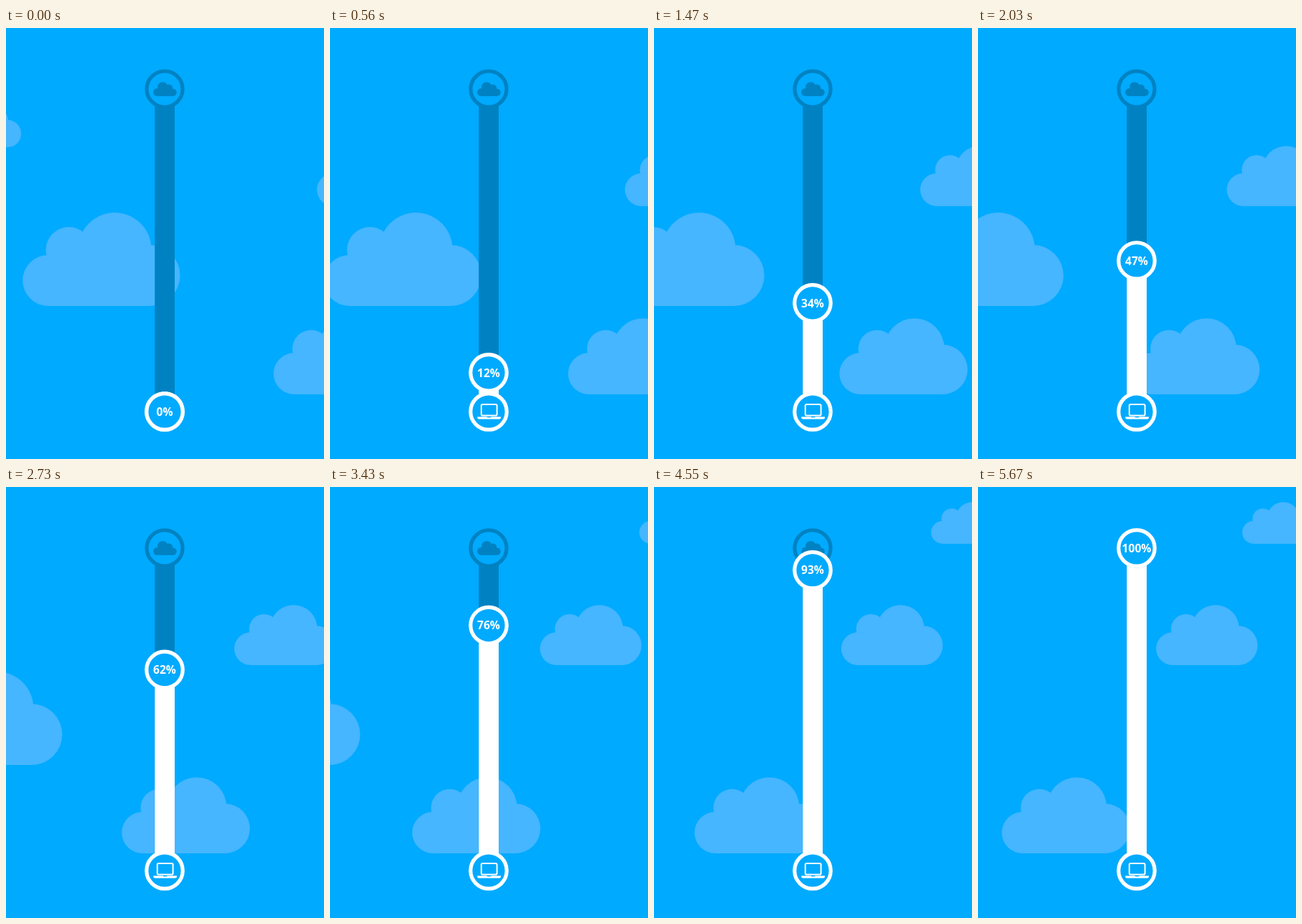
These frames come from a looping animation (443x600 px, 6.37 s). An HTML page:

```html
<!DOCTYPE html>
<html lang="en">
<head>
<meta charset="utf-8">
<title>Upload progress</title>
<style>
  html, body { margin: 0; width: 100%; height: 100%; overflow: hidden; background: #00aaff; }
  svg { display: block; width: 100%; height: 100%; }
  .cloud { fill: #45b6ff; }
  .dark { fill: #0082c2; }
  .ring { fill: #00aaff; stroke: #fff; stroke-width: 5.2; }
  .ring.goal { stroke: #0082c2; }
  text { font: 700 15.6px "Open Sans", "Noto Sans", sans-serif; fill: #fff; text-anchor: middle; }
</style>
</head>
<body>
<svg viewBox="0 0 443 600">
  <defs>
    <g id="cloud">
      <circle cx="35.7" cy="-35.5" r="35.5"/>
      <circle cx="64.5" cy="-78" r="32"/>
      <circle cx="128.5" cy="-79" r="51"/>
      <circle cx="177" cy="-42.5" r="42.5"/>
      <rect x="35.7" y="-71" width="141.3" height="71"/>
    </g>
  </defs>
  <g id="sky"></g>

  <rect class="dark" x="207.3" y="85" width="27.7" height="449"/>
  <rect id="fill" x="207.3" width="27.7" fill="#fff"/>

  <circle class="ring goal" cx="221" cy="85" r="25"/>
  <g class="dark">
    <circle cx="210.6" cy="89.4" r="5.4"/>
    <circle cx="218.3" cy="82.4" r="7.2"/>
    <circle cx="227" cy="83.6" r="5.2"/>
    <circle cx="232.6" cy="89.6" r="5.2"/>
    <rect x="210.6" y="85" width="22" height="9.8"/>
  </g>

  <circle class="ring" cx="221" cy="534" r="25.2"/>
  <rect x="210.8" y="524" width="21.8" height="15.6" rx="1.8" fill="none" stroke="#fff" stroke-width="2"/>
  <path d="M205.3 541.2H218.6L219.4 542.2H223.8L224.6 541.2H238V542.4Q238 544.4 235.8 544.4H207.5Q205.3 544.4 205.3 542.4Z" fill="#fff"/>

  <g id="knob">
    <circle class="ring" cx="221" cy="0" r="25.2"/>
    <text id="label" x="221" y="5.7">0%</text>
  </g>
</svg>
<script>
  const LOOP = 6370, STEP = 70, END = 5670;
  const BOTTOM = 534, TRAVEL = 449;

  // start x, baseline y, scale, distance travelled to the left
  const clouds = [
    [23, 387, 1, 263.7],
    [372.5, 510, 0.814, 339.5],
    [433, 248, 0.645, 185],
    [630, 79, 0.446, 262],
    [-77, 166, 0.447, 262]
  ];

  // time in ms, progress
  const keys = [
    [0, 0], [560, 0.1206], [1470, 0.3367], [2030, 0.4678],
    [3430, 0.7604], [4550, 0.9315], [END, 1]
  ];

  const $ = id => document.getElementById(id);
  const slope = i => (keys[i + 1][1] - keys[i][1]) / (keys[i + 1][0] - keys[i][0]);

  // tangents of a smooth curve through the keys
  const tangents = keys.map((k, i) => {
    if (i === keys.length - 1) return 0;
    if (i === 0) return slope(0) * 0.96;
    const a = k[0] - keys[i - 1][0], b = keys[i + 1][0] - k[0];
    return (slope(i - 1) * b + slope(i) * a) / (a + b);
  });

  function progress(t) {
    if (t >= END) return 1;
    let i = 0;
    while (t >= keys[i + 1][0]) i++;
    const [t0, p0] = keys[i], [t1, p1] = keys[i + 1];
    const h = t1 - t0, s = (t - t0) / h, r = 1 - s;
    return r * r * (1 + 2 * s) * p0 + s * s * (3 - 2 * s) * p1
      + h * s * r * (r * tangents[i] - s * tangents[i + 1]);
  }

  const sprites = clouds.map(() => {
    const use = document.createElementNS("http://www.w3.org/2000/svg", "use");
    use.setAttribute("href", "#cloud");
    use.setAttribute("class", "cloud");
    return $("sky").appendChild(use);
  });

  function draw(time) {
    const t = Math.min(END, Math.floor(time % LOOP / STEP) * STEP);
    const p = progress(t);
    const y = BOTTOM - TRAVEL * p;

    clouds.forEach(([x, base, scale, dist], i) => {
      sprites[i].setAttribute("transform", `translate(${x - dist * p} ${base}) scale(${scale})`);
    });
    $("fill").setAttribute("y", y);
    $("fill").setAttribute("height", BOTTOM - y);
    $("knob").setAttribute("transform", `translate(0 ${y})`);
    $("label").textContent = (p < 1 ? Math.min(99, Math.round(p * 100)) : 100) + "%";
  }

  const start = performance.now();
  function tick() {
    draw(performance.now() - start);
    requestAnimationFrame(tick);
  }
  tick();
</script>
</body>
</html>
```
